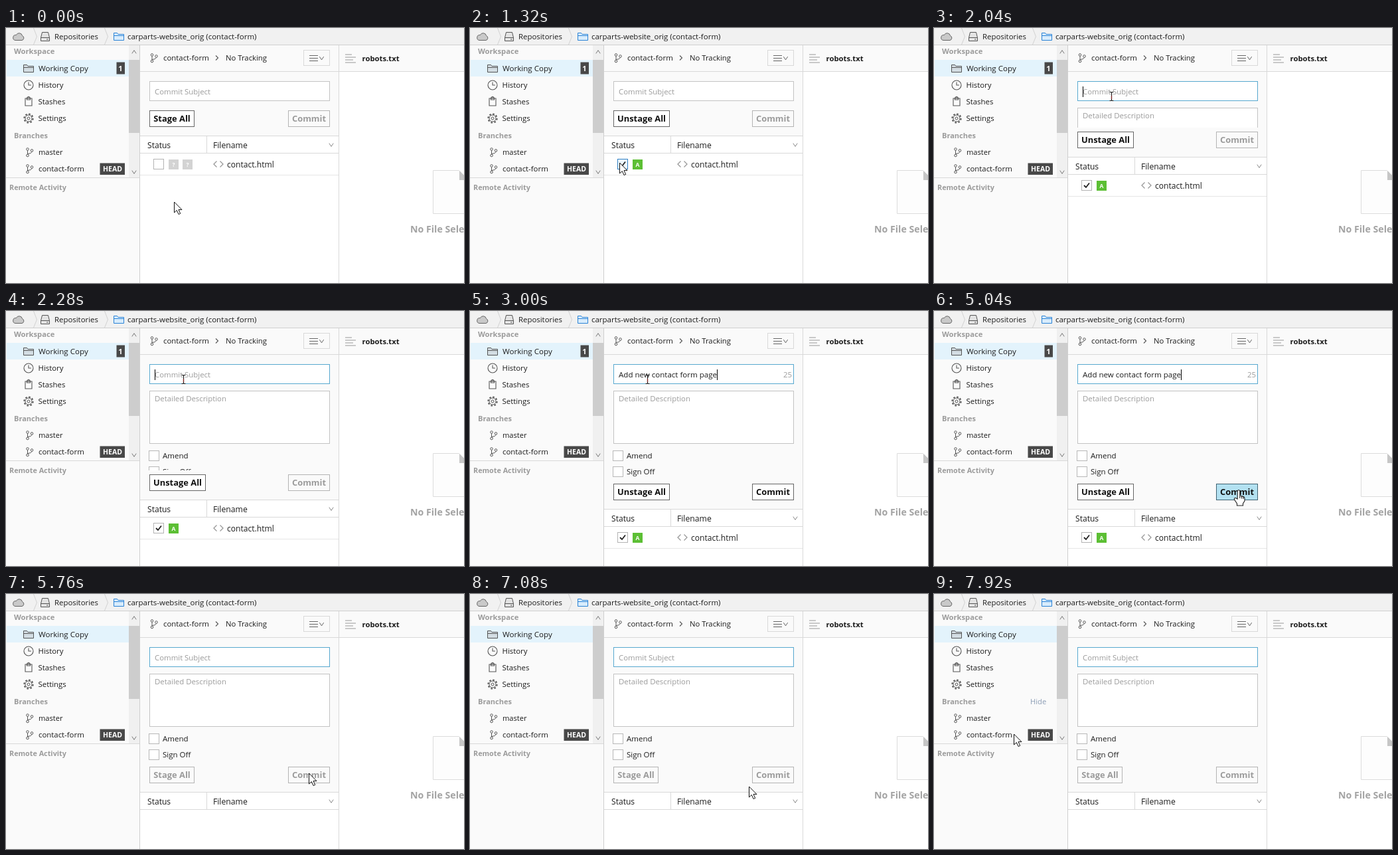
These frames come from a looping animation (690 by 384 pixels, 8 s). An HTML page with a canvas:

```html
<!DOCTYPE html>
<html lang="en">
<head>
<meta charset="utf-8">
<title>Commit workflow</title>
<style>
  html, body { margin: 0; width: 100%; height: 100%; overflow: hidden; background: #fff; }
  canvas { display: block; width: 690px; height: 384px; }
</style>
</head>
<body>
<canvas id="stage"></canvas>
<script>
const W = 690, H = 384, LOOP = 8000, STEP = 120;
const canvas = document.getElementById('stage');
const ctx = canvas.getContext('2d', { alpha: false });
const ratio = window.devicePixelRatio || 1;
canvas.width = W * ratio;
canvas.height = H * ratio;

const INK = '#1c1c1c', ICON = '#555', MUTED = '#9b9b9b', LINE = '#d9d9d9', PANEL = '#fafafa';

// Tracks: [time, value...]
const POINTER = [[0, 253, 262], [360, 225, 203], [1320, 225, 203], [1800, 267, 102],
  [3840, 267, 102], [4680, 459, 269], [5640, 459, 269], [5760, 456, 270], [6840, 456, 270],
  [7080, 420, 290], [7320, 280, 276], [7680, 131, 221], [7920, 120, 211]];
const EXPAND = [[0, 0], [1920, 0], [2040, 32], [2160, 86], [2280, 122], [2400, 136]];
const SHAPE = [[0, 'arrow'], [1800, 'beam'], [4200, 'arrow'], [4440, 'hand'], [5760, 'arrow']];
const CARET_FLIPS = [1920, 2640, 3000, 3480, 3960, 4440, 5040, 5640, 6240, 6720, 7200, 7800];

function tween(track, t) {
  const next = track.findIndex(key => key[0] > t);
  if (next < 0) return track[track.length - 1].slice(1);
  const a = track[next - 1], b = track[next], p = (t - a[0]) / (b[0] - a[0]);
  return a.slice(1).map((v, i) => v + (b[i + 1] - v) * p);
}
const held = (track, t) => track.filter(key => key[0] <= t).pop()[1];

function text(str, x, y, { size = 11.4, color = INK, bold = false, align = 'left' } = {}) {
  ctx.font = `${bold ? 'bold ' : ''}${size}px "Open Sans", "Noto Sans", sans-serif`;
  ctx.textAlign = align;
  ctx.fillStyle = color;
  ctx.fillText(str, x, y);
  return ctx.measureText(str).width;
}
function rect(x, y, w, h, color) {
  ctx.fillStyle = color;
  ctx.fillRect(x, y, w, h);
}
function box(x, y, w, h, border, fill = '#fff') {
  rect(x, y, w, h, border);
  rect(x + 1, y + 1, w - 2, h - 2, fill);
}
function path(d, x, y, stroke, fill, width = 1) {
  const shape = new Path2D(d);
  ctx.save();
  ctx.translate(x, y);
  if (fill) { ctx.fillStyle = fill; ctx.fill(shape); }
  if (stroke) { ctx.strokeStyle = stroke; ctx.lineWidth = width; ctx.stroke(shape); }
  ctx.restore();
}
function circle(x, y, r, color, width = 1, dash = []) {
  ctx.beginPath();
  ctx.arc(x, y, r, 0, Math.PI * 2);
  ctx.strokeStyle = color;
  ctx.lineWidth = width;
  ctx.setLineDash(dash);
  ctx.stroke();
  ctx.setLineDash([]);
}

function branchIcon(x, y) {
  circle(x - 3, y - 4.5, 1.8, ICON);
  circle(x + 3.5, y - 2.5, 1.8, ICON);
  circle(x - 3, y + 5, 1.8, ICON);
  path('M-3,-2.5 V3 M3.5,-.5 Q3,2 -2.5,2.5', x, y, ICON);
}
const folderIcon = (x, y, color, fill) =>
  path('M.5,11.5 V.5 H5.5 L7,2.5 H15.5 V11.5 Z M.5,4.5 H15.5', x, y, color, fill);
const chevron = (x, y, color, dir = 1) =>
  path(`M-3.2,${-2.4 * dir} L0,${2.4 * dir} L3.2,${-2.4 * dir}`, x, y, color);

function drawToolbar() {
  rect(0, 0, W, 26, '#f1f1f1');
  rect(0, 25, W, 1, '#cfcfcf');
  for (const x of [41.5, 148.5]) path('M0,0 L5,13 L0,25', x, 0, '#d2d2d2');
  path('M4,11.5 H14 A3.6,3.6 0 0 0 14.5,4.6 A4.8,4.8 0 0 0 5.4,3.6 A4,4 0 0 0 4,11.5 Z', 10, 7, '#666', '#c9c9c9');
  path('M2.5,.5 H11.5 L13.5,8.5 V13.5 H.5 V8.5 Z M.5,8.5 H13.5 M9,11 H11.5', 52, 6, '#555', '#e4e4e4');
  text('Repositories', 73, 17);
  folderIcon(162, 7, '#2b83d6', '#d8ecfc');
  text('carparts-website_orig (contact-form)', 183, 17, { size: 11.5 });
}

function drawSidebar(s) {
  rect(0, 26, 201, 358, PANEL);
  text('Workspace', 12, 39, { size: 11.2, color: MUTED, bold: true });
  rect(1, 48, 184, 25, '#e3f3fc');
  folderIcon(26, 55, ICON, '#d3dde3');
  text('Working Copy', 49, 65, { size: 11.6 });
  if (!s.committed) {
    rect(166.5, 51.5, 12.5, 18, '#484848');
    text('1', 172.5, 65, { size: 11, color: '#fff', bold: true, align: 'center' });
  }
  circle(34, 86, 7, ICON, 1.1);
  path('M0,-4.5 V0 H4', 34, 86, ICON, null, 1.1);
  text('History', 48.5, 90);
  path('M.5,2.5 H10.5 V13.5 H.5 Z M3,4.5 V1.5 H4.5 V0 H6.5 V1.5 H8 V4.5 Z', 28.5, 103.5, ICON, null, 1.1);
  text('Stashes', 48.5, 115);
  circle(34, 136, 6.6, ICON, 2, [2.6, 2.58]);
  circle(34, 136, 5, ICON);
  circle(34, 136, 2, ICON);
  text('Settings', 48.5, 140);
  text('Branches', 12, 166, { size: 11, color: MUTED, bold: true });
  if (s.hide) text('Hide', 145, 166, { size: 11.2, color: '#8c9db5' });
  branchIcon(35.5, 187);
  text('master', 49, 191, { size: 11.1 });
  branchIcon(35.5, 212);
  text('contact-form', 49, 216);
  rect(141.5, 203.5, 37.5, 17.5, '#484848');
  text('HEAD', 160.5, 216, { size: 10.5, color: '#fff', bold: true, align: 'center' });

  rect(185, 26, 16, 199, '#f0f0f0');
  rect(185, 48, 16, 110, '#cdcdcd');
  chevron(193, 36, '#777', -1);
  chevron(193, 217, '#777');
  rect(0, 225, 201, 1, LINE);
  text('Remote Activity', 5, 244, { size: 10.8, color: MUTED, bold: true });
  rect(201, 26, 1, 358, '#cfcfcf');
}

function drawButton(label, x, y, w, state) {
  const [border, fill, ink] = {
    normal: ['#666', '#fff', '#111'],
    hover: ['#3f6272', '#b3e1f1', '#111'],
    cleared: ['#b4b4b4', PANEL, '#444'],
    disabled: ['#b4b4b4', PANEL, MUTED],
  }[state];
  box(x, y, w, 25, border, fill);
  text(label, x + w / 2, y + 17, { size: 12.9, color: ink, bold: true, align: 'center' });
}

function drawSubject(s) {
  box(216, 80, 272, 30, s.focused ? '#57a8cf' : '#c3c3c3');
  let caretX = 224;
  if (s.typed) {
    caretX = Math.round(224 + text('Add new contact form page', 224, 100, { size: 11.55 }));
    text('25', 485, 100, { color: MUTED, align: 'right' });
  } else {
    text('Commit Subject', 224, 100, { color: MUTED });
  }
  if (s.caret) rect(caretX, 88, 1, 16, '#000');
}

function drawDetails(open) {
  ctx.save();
  ctx.beginPath();
  ctx.rect(202, 112, 299, 6 + open);
  ctx.clip();
  box(216, 120, 272, 80, '#c3c3c3');
  text('Detailed Description', 224, 136, { color: MUTED });
  ['Amend', 'Sign Off'].forEach((label, i) => {
    box(215, 210 + i * 24, 16, 16, '#b8b8b8');
    text(label, 236, 222 + i * 24, { size: 11.5 });
  });
  ctx.restore();
}

function drawTable(s, open) {
  ctx.save();
  ctx.translate(0, open);
  rect(202, 162, 299, 222, '#fff');
  rect(202, 162, 299, 1, LINE);
  text('Status', 213, 181, { size: 12.1 });
  text('Filename', 312, 181, { size: 12.2 });
  chevron(490, 176, '#888');
  rect(302, 163, 1, 25, LINE);
  rect(202, 188, 299, 1, LINE);
  if (!s.committed) {
    box(222, 197, 16, 16, s.rowHover ? '#2f7fc4' : '#b3b3b3', s.rowHover ? '#eef7fd' : '#fff');
    if (s.checked) path('M4,8 L7,11 L12,4.5', 222, 197, '#222', null, 1.8);
    const badges = s.staged ? ['A'] : ['?', '?'];
    badges.forEach((mark, i) => {
      rect(245 + i * 21, 198, 15, 15, s.staged ? '#5cbf34' : '#d3d3d3');
      text(mark, 252.5 + i * 21, 209, { size: 8.5, color: '#fff', bold: true, align: 'center' });
    });
    path('M5,-4.5 L.5,0 L5,4.5 M10,-4.5 L14.5,0 L10,4.5', 312.5, 205, '#999', null, 1.3);
    text('contact.html', 333, 210, { size: 12.1 });
    rect(202, 221, 299, 1, '#e6e6e6');
  }
  ctx.restore();
}

function drawCommitPanel(s) {
  const open = Math.round(s.open);
  rect(202, 26, 299, 358, PANEL);
  branchIcon(223, 45);
  text('contact-form', 237, 49);
  path('M-2,-3.5 L1.5,0 L-2,3.5', 318, 45, '#555', null, 1.1);
  text('No Tracking', 331, 49, { size: 11.3 });
  box(448, 33, 40, 24, LINE, PANEL);
  for (const y of [41, 45, 49]) rect(457, y, 13, 1, '#666');
  chevron(475.5, 45.5, '#666');
  rect(202, 65, 299, 1, LINE);

  drawSubject(s);
  drawDetails(open);
  const buttonY = 124 + open;
  if (s.committed) drawButton('Stage All', 216, buttonY, 68, 'disabled');
  else if (s.staged) drawButton('Unstage All', 216, buttonY, 85, 'normal');
  else drawButton('Stage All', 216, buttonY, 68, 'normal');
  drawButton('Commit', 425, buttonY, 63, s.commit);
  drawTable(s, open);
}

function drawFilePane() {
  rect(501, 26, 1, 358, LINE);
  rect(502, 26, 188, 358, '#fff');
  rect(502, 26, 188, 39, PANEL);
  rect(502, 65, 188, 1, LINE);
  [10, 16, 12, 16].forEach((w, i) => rect(511, 39 + i * 4, w, 2, '#c9c9c9'));
  text('robots.txt', 536.5, 50, { size: 11.3, bold: true });
  path('M.5,.5 H39.5 L54.5,15.5 V65.5 H.5 Z', 643, 214, '#dcdcdc', '#fdfdfd');
  path('M0,1 V15 H14 Z', 683, 214, null, '#c6c6c6');
  text('No File Selected', 609, 308, { size: 14.2, color: '#a3a3a3', bold: true });
}

function drawPointer(s) {
  const [x, y] = s.pointer.map(Math.round);
  if (s.shape === 'beam') {
    path('M-3,-5.5 H-1 L0,-4.5 L1,-5.5 H3 M0,-4.5 V6 M-3,7.5 H-1 L0,6.5 L1,7.5 H3', x + 0.5, y, '#222', null, 1.2);
    path('M0,0 V5', x + 0.5, y, '#8a2525', null, 1.2);
  } else if (s.shape === 'hand') {
    path('M-1.8,14 V2 Q0,-1 1.8,2 V9 L7,10.2 Q9,11 9,13 V17 L6.5,21 V24 H-2.5 V21 L-6.5,15 Q-7,12 -4.5,12.5 Z M1.8,9 V13 M4.5,9.8 V13.5 M7,10.2 V14',
      x, y, '#222', '#fff', 1.1);
  } else {
    path('M0,0 V16 L3.8,12.5 L6.6,18.6 L9.2,17.4 L6.5,11.6 H11.5 Z', x + 0.5, y, '#111', '#fff');
  }
}

function stateAt(t) {
  const commit = t < 3000 ? 'disabled' : t < 4440 ? 'normal' : t < 5400 ? 'hover' : t < 5640 ? 'cleared' : 'disabled';
  return {
    commit,
    pointer: tween(POINTER, t),
    shape: held(SHAPE, t),
    open: tween(EXPAND, t)[0],
    caret: CARET_FLIPS.filter(flip => flip <= t).length % 2 === 1,
    focused: t >= 1920,
    typed: t >= 3000 && t < 5280,
    rowHover: t >= 360 && t < 1440,
    checked: t >= 840,
    staged: t >= 960,
    committed: t >= 5280,
    hide: t >= 7680,
  };
}

function render(now) {
  const t = Math.floor((now % LOOP) / STEP) * STEP;
  const state = stateAt(t);
  ctx.setTransform(ratio, 0, 0, ratio, 0, 0);
  rect(0, 0, W, H, '#fff');
  drawCommitPanel(state);
  drawFilePane();
  drawSidebar(state);
  drawToolbar();
  drawPointer(state);
}

const start = performance.now();
function loop() {
  render(performance.now() - start);
  requestAnimationFrame(loop);
}
loop();
</script>
</body>
</html>
```
